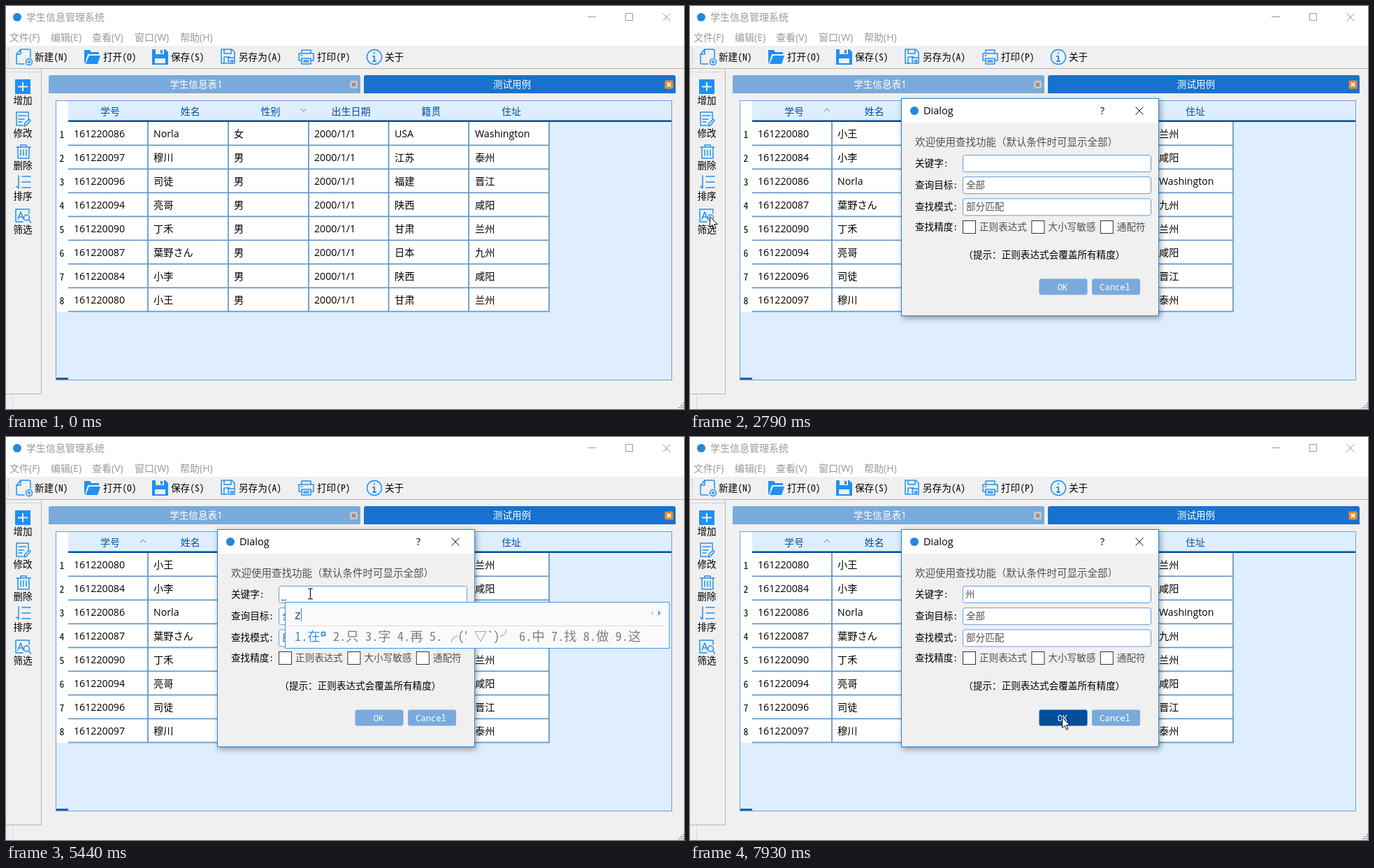
Write an HTML page that moves like this. It is 970 px wide and 577 px high and loops after 8 s.

```html
<!DOCTYPE html>
<html lang="zh-CN">
<head>
<meta charset="utf-8">
<title>学生信息管理系统</title>
<style>
html, body { margin: 0; width: 100%; height: 100%; overflow: hidden; background: #f0f0f0; }
svg { display: block; width: 100%; height: 100%; }
text { font: 14px 'Open Sans', 'Noto Sans CJK SC', 'Noto Sans CJK', sans-serif; white-space: pre; }
text.cell { font-size: 14.2px; }
text.song { font: 300 13.6px 'Noto Sans Mono CJK SC', 'Noto Sans CJK SC', 'Noto Sans CJK', monospace; }
text.mono { font: 12.2px 'Noto Sans Mono', monospace; fill: #fff; }
text.ime { font: 300 18.36px 'Noto Sans Mono CJK SC', 'Noto Sans CJK SC', 'Noto Sans CJK', monospace; fill: #808080; }
text.typed { font: 17.6px 'Liberation Sans', sans-serif; fill: #505050; }
.mid { text-anchor: middle; }
.soft { fill: #505050; }
.icon { fill: none; stroke: #1e90f5; stroke-width: 1.5; stroke-linejoin: round; stroke-linecap: round; }
.solid { fill: #1e90f5; }
.field { fill: #fff; stroke: #6699d5; }
.dots { stroke: #999; stroke-dasharray: 1 2; }
</style>
</head>
<body>
<svg viewBox="0 0 970 577" preserveAspectRatio="none">
  <rect width="970" height="577" fill="#f0f0f0"/>
  <rect width="970" height="57" fill="#fff"/>
  <circle cx="16" cy="16" r="6" fill="#2387db"/>
  <g id="title">
    <text x="29" y="21">学生信息管理系统</text>
    <path d="M832 15.5h12M886.5 10.5h10v10h-10zM939.5 10.5l11 11m0-11l-11 11" fill="none" stroke="currentColor"/>
  </g>
  <g id="menu"></g>

  <path d="M0 89.5H970M50.5 90V555.5H0" fill="none" stroke="#b4b4b4"/>
  <path d="M9.5 557V577" stroke="#d8d8d8"/>
  <path class="dots" d="M3.5 60V87M2 94.5H48"/>
  <path d="M969 568v9M966 571v6M963 574v3" stroke="#a8a8a8" stroke-width="2" stroke-dasharray="2 1"/>

  <g class="icon">
    <path d="M26 83H17q-2 0-2-2V69l6-7h12q2 0 2 2v10M15 69h6v-7"/>
    <circle cx="33" cy="80" r="4.5"/><path d="M33 78v4m-2-2h4"/>
    <path class="solid" stroke="none" d="M112 82V63h8l2 3h11v3h-16l-4 13zM114 83l5-12h16l-4 12z"/>
    <path class="solid" stroke="none" fill-rule="evenodd" d="M209 62h19l4 4v18h-23zM214 62v7h12v-7zM213 75v7h15v-7zM221 63h3v5h-3z"/>
    <path d="M316 82h-8V62h15l4 4v8M312 62v6h10v-6M312 82v-9h8M318 74h9v8h-9zM320 79h4m-1-2l2 2-2 2"/>
    <path d="M423 68v-5h13v5M423 78h-4V68h21v10h-4M423 75h13v8h-13zM426 78h7m-7 2h7M422 71h2"/>
    <circle cx="527" cy="73" r="10.5"/><path d="M527 72v7m-2 0h4M525 72h2M527 67v.5" stroke-width="2"/>
    <path class="solid" stroke="none" fill-rule="evenodd" d="M13 105h22v21H13zM23 109v5.500h-6v2h6v5.500h2v-5.500h6v-2h-6V109z"/>
  </g>
  <rect id="hot" x=".5" y="288.5" width="47" height="40" fill="#e5f3ff" stroke="#cce8ff"/>
  <g class="icon">
    <path d="M24 171h-9v-19h17v9M18 157h11m-11 5h8m-8 4h5M26 172l1-4 6-6 2 2-6 7z"/>
    <path d="M15 202h20M21 202v-3h8v3M17 202v16h16v-16M21 206v8m4-8v8m4-8v8"/>
    <path d="M18 243v18l-3-3M23 244h12M23 252h12M23 260h12"/>
    <path d="M24 309h-10v-18h19v6M17 305l4-10 4 10m-7-3h5"/>
    <circle cx="29.5" cy="303" r="4"/><path d="M32.5 306l3 4"/>
  </g>
  <g id="labels"></g>

  <path d="M61 125V102q0-3 3-3H504q3 0 3 3V125z" fill="#7aaadc"/>
  <path d="M512 125V102q0-3 3-3H955q3 0 3 3V125z" fill="#1872ce"/>
  <text class="mid" x="272" y="117" fill="#fff" style="font-size:13.6px">学生信息表1</text>
  <text class="mid" x="724" y="117" fill="#fff" style="font-size:13.6px">测试用例</text>
  <rect x="492" y="107" width="11" height="11" rx="2" fill="#c9c7c4"/>
  <rect x="942.5" y="106.5" width="12" height="12" rx="2" fill="#e48b35"/>
  <path d="M495 110l5 5m0-5l-5 5" stroke="#777" stroke-width="1.5"/>
  <path d="M946 110l5 5m0-5l-5 5" stroke="#fff" stroke-width="1.8"/>

  <rect x="71.5" y="135.5" width="881" height="400" fill="#deeeff" stroke="#6d9fd4"/>
  <rect x="72" y="136" width="17" height="302" fill="#fff"/>
  <rect x="89" y="166" width="688" height="272" fill="#fff"/>
  <rect id="head" x="89" y="136" width="115" height="28" fill="#1872ce"/>
  <path d="M89 164.7H952M72 533.5H89" stroke="#004f9f" stroke-width="2.5"/>
  <g id="grid" stroke="#6699cc" stroke-width="1.8"></g>
  <g id="table"></g>
  <path id="chevron" fill="none" stroke="#777"/>
  <rect id="focus" x="93.5" y="302.5" width="104" height="32" fill="none" stroke="#222" stroke-dasharray="1 1"/>

  <g id="dialog">
    <rect x="302.5" y="132.5" width="368" height="311" fill="#f0f0f0" stroke="#2a84cc" style="filter:drop-shadow(2px 3px 4px rgba(0,0,0,.38))"/>
    <rect x="303" y="133" width="367" height="34" fill="#fff"/>
    <circle cx="321" cy="150" r="6" fill="#2387db"/>
    <text x="334" y="155" style="font-size:14.5px">Dialog</text>
    <text x="587" y="155">?</text>
    <path d="M637.5 144.5l11 11m0-11l-11 11" stroke="#111"/>
    <g id="form"></g>
    <rect id="ok" x="499.5" y="390.5" width="69" height="23" rx="3"/>
    <rect x="575" y="390.5" width="69" height="23" rx="3" fill="#7aaadc"/>
    <text class="mono mid" x="533" y="407">OK</text>
    <text class="mono mid" x="608" y="407">Cancel</text>
    <text id="entry" class="song soft" x="394" y="230">州</text>
    <path id="compose" d="M394 233.5h7" stroke="#222" stroke-dasharray="3 1"/>
    <path id="caret" d="M0 219V232" stroke="#000"/>
  </g>

  <g id="popup">
    <rect id="popupBox" x="399.5" y="236.5" height="66" fill="#fafafa" stroke="#3c98e4"/>
    <path id="popupLine" stroke="#dcdcdc"/>
    <text id="typed" class="typed" x="413" y="261"></text>
    <path id="typedCaret" d="M0 245V264" stroke="#2a8be0"/>
    <path id="back" d="M3 248v8l-4-4z" fill="#dadada"/>
    <path id="next" d="M-2 248v8l4-4z" fill="#58aae8"/>
    <g id="choices"></g>
  </g>

  <path id="arrow" d="M.5.5V15.500L4 12.200 6.500 18 9 17 6.500 11.500H11.300z" fill="#fff" stroke="#111"/>
  <path id="beam" d="M-3.5-7.500h2.500l1 1 1-1h2.500M0-7V7M-3.500 7.500h2.500l1-1 1 1h2.500" fill="none" stroke="#111" stroke-width="1.2"/>
</svg>
<script>
const LOOP = 8000, ROW = 34;
const $ = id => document.getElementById(id);

function add(parent, tag, attrs, content = '') {
  const node = document.createElementNS('http://www.w3.org/2000/svg', tag);
  for (const key in attrs) node.setAttribute(key, attrs[key]);
  node.textContent = content;
  parent.appendChild(node);
  return node;
}
const write = (parent, x, y, content, cls = '') => add(parent, 'text', { x, y, class: cls }, content);
const set = (id, key, value) => $(id).setAttribute(key, value);
const show = (id, on) => { $(id).style.display = on ? '' : 'none'; };
const move = (id, x, y = 0) => set(id, 'transform', `translate(${x} ${y})`);

// Static labels
['文件(F)', '编辑(E)', '查看(V)', '窗口(W)', '帮助(H)'].forEach((s, i) =>
  write($('menu'), [5, 64, 123, 184, 249][i], 50, s));
['新建(N)', '打开(O)', '保存(S)', '另存为(A)', '打印(P)', '关于'].forEach((s, i) =>
  write($('labels'), [41, 139, 236, 333, 445, 542][i], 77.5, s, 'song'));
['增加', '修改', '删除', '排序', '筛选'].forEach((s, i) =>
  write($('labels'), 24, [140, 187, 233, 277, 325][i], s, 'song mid'));

// Table
const edges = [203, 318, 433, 547.5, 662, 777];
const cellX = [97, 211, 326, 441, 556, 671];
for (const x of edges) add($('grid'), 'path', { d: `M${x} 166V438` });
const headings = ['学号', '姓名', '性别', '出生日期', '籍贯', '住址'].map((s, i) => {
  const node = write($('table'), 149 + i * 114.8, 155.5, s, 'mid');
  node.setAttribute('fill', '#00509f');
  return node;
});
const students = [
  ['080', '小王', '男', '甘肃', '兰州'],
  ['084', '小李', '男', '陕西', '咸阳'],
  ['086', 'Norla', '女', 'USA', 'Washington'],
  ['087', '葉野さん', '男', '日本', '九州'],
  ['090', '丁禾', '男', '甘肃', '兰州'],
  ['094', '亮哥', '男', '陕西', '咸阳'],
  ['096', '司徒', '男', '福建', '晋江'],
  ['097', '穆川', '男', '江苏', '泰州']
];
const bySex = [7, 6, 0, 5, 4, 3, 2, 1];
const rows = students.map(([id, name, sex, origin, home], i) => {
  add($('grid'), 'path', { d: `M89 ${199.3 + i * ROW}H778` });
  write($('table'), 80, 188.5 + i * ROW, i + 1, 'song mid');
  const row = add($('table'), 'g');
  ['161220' + id, name, sex, '2000/1/1', origin, home].forEach((s, c) =>
    write(row, cellX[c], 187.5, s, 'cell'));
  return row;
});

// Search form
const form = $('form');
write(form, 322, 200, '欢迎使用查找功能（默认条件时可显示全部）', 'song soft').style.fontSize = '14.5px';
['关键字:', '查询目标:', '查找模式:', '查找精度:'].forEach((s, i) =>
  write(form, 322, [230, 261, 292, 321][i], s, 'song'));
['', '全部', '部分匹配'].forEach((s, i) => {
  const y = 213.5 + i * 31.2;
  add(form, 'rect', { x: 390.5, y, width: 269, height: 24, rx: 3, class: 'field' });
  write(form, 395, y + 16.5, s, 'song soft');
});
['正则表达式', '大小写敏感', '通配符'].forEach((s, i) => {
  const x = 390.5 + i * 98.4;
  add(form, 'rect', { x, y: 307.5, width: 18, height: 18, fill: '#fff', stroke: '#333' });
  write(form, x + 23.5, 321, s, 'song soft');
});
write(form, 391.3, 360.5, '（提示：正则表达式会覆盖所有精度）', 'song');

// Input popup: start, typed letters, caret x, right edge, candidates as [x, text]
const popups = [
  [5370, 'z', 422.5, 949, [[413, '1.在'], [468, '2.只 3.字 4.再 5.'], [628, '╭(′ ▽`)╯'], [734, '6.中 7.找 8.做 9.这']]],
  [5510, 'zh', 432.5, 969, [[413, '1.这'], [459, '2.中 3.找 4.这个 5.知道 6.真的 7.这样 8.只有 9.正在']]],
  [5600, 'zho', 441.5, 854, [[413, '1.中'], [459, '2.周 3.种 4.重 5.州 6.众 7.终 8.钟 9.洲']]],
  [5680, 'zhou', 450.5, 854, [[413, '1.周'], [459, '2.轴 3.州 4.粥 5.洲 6.肘 7.咒 8.舟 9.皱']]]
];
let shownPopup;
function fillPopup(popup) {
  if (popup === shownPopup) return;
  shownPopup = popup;
  const [, letters, caretX, right, choices] = popup;
  set('popupBox', 'width', right - 399.5);
  set('popupLine', 'd', `M406 270.5H${right - 7}`);
  $('typed').textContent = letters;
  move('typedCaret', caretX);
  move('back', right - 26);
  move('next', right - 14);
  $('choices').textContent = '';
  choices.forEach(([x, s], i) => {
    write($('choices'), x, 292, s, 'ime').style.fill = i ? '' : '#3f93dd';
  });
  if (letters === 'z')
    add($('choices'), 'rect', { x: 451.5, y: 279.5, width: 5, height: 5, rx: 1, fill: 'none', stroke: '#3f93dd', 'stroke-width': 2 });
}

// Pointer legs: start, end, number of steps, target x, y
const legs = [
  [390, 1090, 10, 160, 161],
  [1640, 2260, 9, 55, 290],
  [2330, 2410, 2, 34, 299],
  [2490, 2490, 1, 28, 301],
  [2800, 3430, 9, 469, 241],
  [3570, 3960, 6, 435, 224],
  [6460, 6530, 2, 436, 218],
  [6600, 7150, 8, 541, 404],
  [7220, 7380, 3, 533, 402],
  [7530, 7530, 1, 532, 401]
];
function pointer(t) {
  let x = 720, y = 610;
  for (const [from, to, steps, tx, ty] of legs) {
    if (t < from) break;
    const gap = (to - from) / (steps - 1) || 1;
    const p = Math.min(1, (Math.floor((t - from) / gap) + 1) / steps);
    const e = p * p * (3 - 2 * p);
    x += (tx - x) * e;
    y += (ty - y) * e;
  }
  return [x, y];
}

const within = (t, ...spans) => spans.some(([a, b]) => t >= a && t < b);

function draw(t) {
  const [x, y] = pointer(t);
  const sorted = t >= 1410, open = t >= 2720, done = t >= 6380;
  const titleColor = within(t, [1260, 2720]) ? '#000' : '#999';
  set('title', 'fill', titleColor);
  set('title', 'color', titleColor);
  set('menu', 'fill', within(t, [1330, 2720]) ? '#000' : '#999');

  const hover = !open && x > 89 && x < 203 && y > 136 && y < 166;
  show('head', hover);
  headings[0].setAttribute('fill', hover ? '#fff' : '#00509f');
  set('chevron', 'd', sorted ? 'M192 151l4-4 4 4' : 'M421.5 147l4 4 4-4');
  rows.forEach((row, i) => row.setAttribute('transform', `translate(0 ${ROW * (sorted ? i : bySex[i])})`));
  show('focus', within(t, [1330, 2720]));
  show('hot', within(t, [2330, 2720]));

  show('dialog', open);
  const p = Math.max(0, Math.min(1, (Math.floor((t - 2720) / 70) + 2) / 3)), k = .9 + .1 * p;
  set('dialog', 'opacity', p);
  set('dialog', 'transform', `translate(${487 * (1 - k)} ${288 * (1 - k)}) scale(${k})`);
  const overOk = open && x > 500 && x < 568 && y > 391 && y < 413;
  set('ok', 'fill', t >= 7930 ? '#004f9f' : overOk ? '#1872ce' : '#7aaadc');

  show('entry', done);
  show('compose', within(t, [5370, 6380]));
  show('caret', within(t, [3730, 4260], [4810, 5280], [5830, 6380], [6910, 7380]));
  move('caret', done ? 407.5 : t >= 5370 ? 400.5 : 393.5);

  const popup = popups.filter(s => t >= s[0]).pop();
  show('popup', popup && !done);
  if (popup) fillPopup(popup);

  const beam = open && x > 390 && x < 660 && y > 213 && y < 238;
  show('arrow', t >= 390 && !beam);
  show('beam', beam);
  move('arrow', x, y);
  move('beam', x + .5, y + .5);
}

const start = performance.now();
function tick() {
  draw((performance.now() - start) % LOOP);
  requestAnimationFrame(tick);
}
tick();
</script>
</body>
</html>
```
